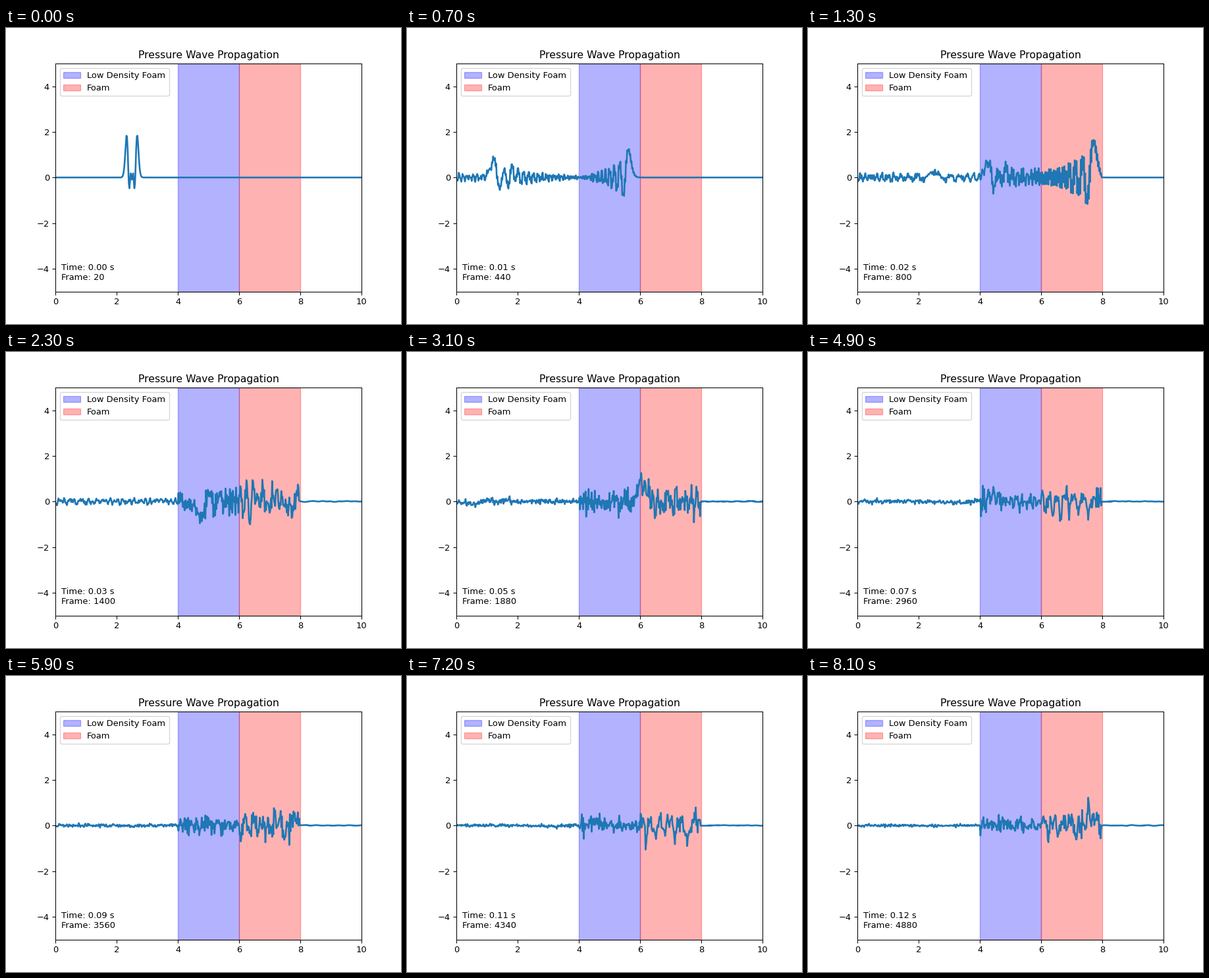
A matplotlib script that plays this animation: 600 px wide and 450 px high, repeating every 8.2 s.

```python
import numpy as np
import matplotlib.pyplot as plt
from matplotlib.animation import FuncAnimation

FRAMES, INTERVAL = 82, 100
FIRST_STEP, STEPS_PER_FRAME = 20, 60
DT = 2.45e-5                      # seconds per step

# Medium: air with two foam layers
CELLS, LENGTH = 500, 10.0
dx = LENGTH / CELLS
x = np.linspace(0, LENGTH, CELLS + 1)
low_foam = slice(round(4 / dx), round(6 / dx))
foam = slice(round(6 / dx), round(8 / dx))

density = np.full(x.size, 1.2)
density[low_foam] = 20.0
density[foam] = 100.0
travel = np.full(x.size, 0.0099)  # distance covered per step
travel[low_foam] = travel[foam] = 0.00587

# Central differences span two cells, so even and odd nodes evolve separately
stiffness = density * (travel / (2 * dx)) ** 2
EDGE_RATE = 0.4                   # partly absorbing ends


def advance(prev, cur):
    """One leapfrog step of the pressure equation."""
    flux = (cur[2:] - cur[:-2]) / density[1:-1]
    new = np.empty_like(cur)
    new[2:-2] = (2 * cur[2:-2] - prev[2:-2]
                 + stiffness[2:-2] * (flux[2:] - flux[:-2]))
    new[:2] = cur[:2] + EDGE_RATE * (cur[2:4] - cur[:2])
    new[-2:] = cur[-2:] + EDGE_RATE * (cur[-4:-2] - cur[-2:])
    return cur, new


def simulate():
    pulse = 4.2 * np.exp(-0.5 * ((x - 2.5) / 0.032) ** 2)
    prev, cur = pulse, pulse.copy()
    snapshots = []
    last = FIRST_STEP + STEPS_PER_FRAME * (FRAMES - 1)
    for step in range(1, last + 1):
        if step > 1:
            prev, cur = advance(prev, cur)
        if step >= FIRST_STEP and (step - FIRST_STEP) % STEPS_PER_FRAME == 0:
            snapshots.append(cur)
    return snapshots


pressure = simulate()

fig, ax = plt.subplots(figsize=(6.4, 4.8), dpi=93.75)
ax.set_xlim(0, LENGTH)
ax.set_ylim(-5, 5)
ax.set_title("Pressure Wave Propagation")
ax.axvspan(4, 6, color="blue", alpha=0.3, label="Low Density Foam")
ax.axvspan(6, 8, color="red", alpha=0.3, label="Foam")
ax.legend(loc="upper left")
line, = ax.plot(x, pressure[0], lw=2)
info = ax.text(0.02, 0.05, "", transform=ax.transAxes)


def update(i):
    step = FIRST_STEP + STEPS_PER_FRAME * i
    line.set_ydata(pressure[i])
    info.set_text(f"Time: {step * DT:.2f} s\nFrame: {step}")
    return line, info


anim = FuncAnimation(fig, update, frames=FRAMES, interval=INTERVAL,
                     repeat=True, repeat_delay=0)
plt.show()
```
